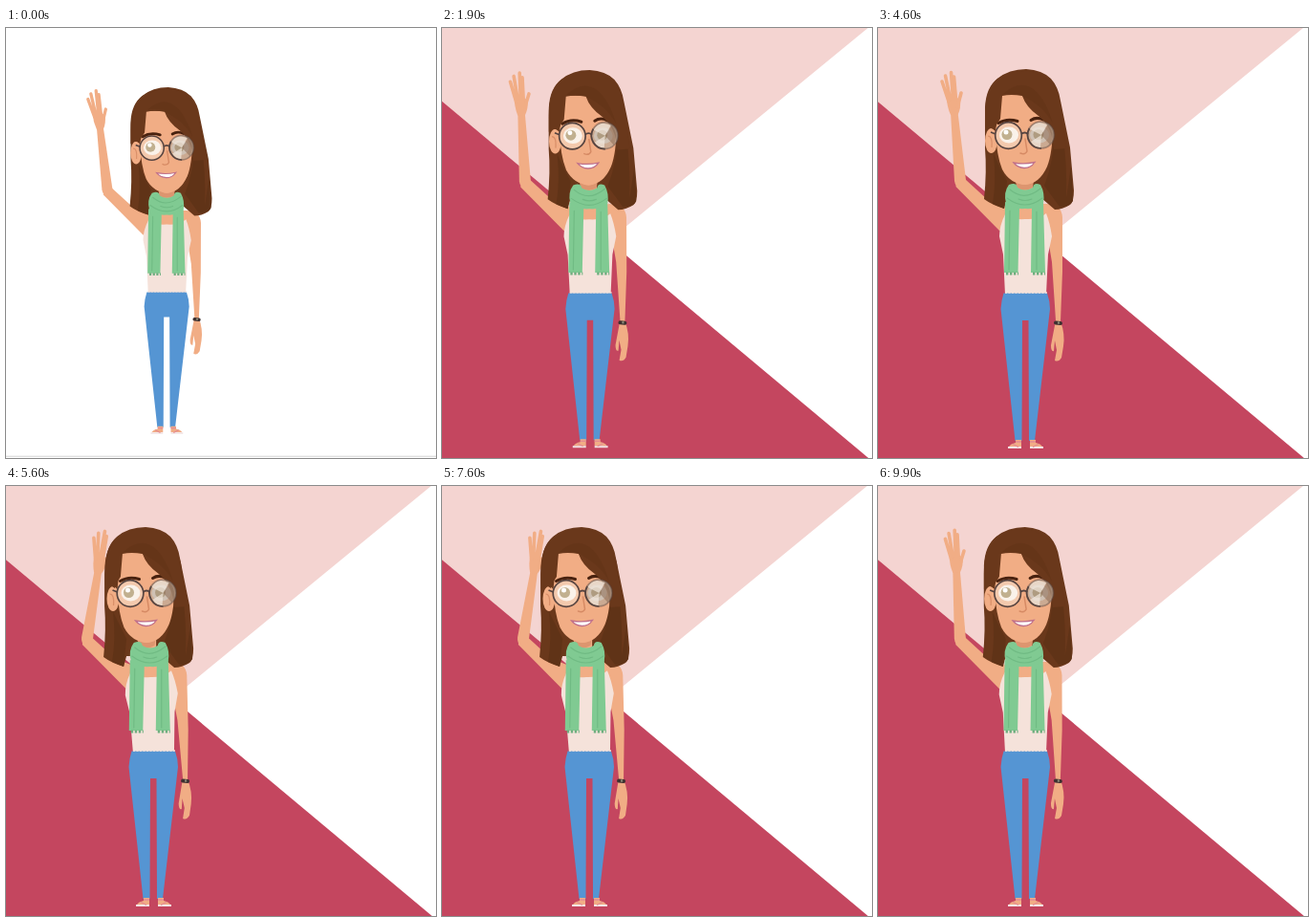
An HTML page that plays this animation: 450x450 px, repeating every 10 s.

```html
<!DOCTYPE html>
<html lang="en">
<head>
<meta charset="utf-8">
<title>Waving woman</title>
<style>
html, body { margin: 0; width: 100%; height: 100%; overflow: hidden; background: #fff; }
svg { display: block; width: 100vw; height: 100vh; }
.skin { fill: #f1ad85; }
.hair { fill: #6a381b; }
.dark { fill: #603317; }
.scarf { fill: #80ca92; }
.fold { fill: none; stroke: #70bb84; stroke-width: 1.2; stroke-linecap: round; }
.finger { fill: none; stroke: #f1ad85; stroke-width: 3.6; stroke-linecap: round; }
</style>
</head>
<body>
<svg viewBox="0 0 450 450">
<g id="scene">
  <path d="M-60 465.5H520" stroke="#d4d4d4" stroke-width="1.2"/>
  <path id="pink" fill="#f4d4d1" d="M-60-60H518L173 223-60 28Z"/>
  <path id="red" fill="#c4465f" d="M-60 27L520 512H-60Z"/>

  <g id="raisedArm">
    <path class="skin" d="M137 189L115 180 91 158Q82 158 81.500 166L127 212 140 210Z"/>
    <g id="forearm">
      <path class="skin" d="M76 88H83.500L92 159Q92 167 86 167 81 167 80 160Z"/>
      <path class="skin" d="M72 73Q79 69 86 75 87 84 83.500 91H76Q72 82 72 73Z"/>
      <path class="finger" d="M74 77L67 56M75.500 74L70.500 50M78.500 74L76.500 46.500M81.500 75L79.500 51M83 83L87 68"/>
    </g>
  </g>

  <g id="hangingArm">
    <path class="skin" d="M174 184Q192 183 193 198L193 255 191 307Q196 320 194 333L192 345Q189 350 185 348L187 337 185 327 184 338Q181 339 181 332L186 306 182 245 177 215Z"/>
    <path d="M186 308.500L191 309" stroke="#3d3030" stroke-width="4" stroke-linecap="round"/>
    <circle cx="189" cy="308.500" r="1.200" fill="#8d8d78"/>
  </g>

  <!-- body -->
  <g id="torso">
    <path class="skin" d="M135 184H176L180 212H128Z"/>
    <path fill="#f5e2da" d="M133 195Q127 207 127 218L131 237 133 279H176L178 237 182 218Q180 204 176 194 168 201 154 200 139 201 133 195Z"/>
    <path class="skin" d="M145 186H162L160 197Q153 202 147 196Z"/>
  </g>
  <path fill="#5595d3" d="M131.500 277.500H177Q180 286 180 294L164 432H158L157.500 306H151L150.500 432H143.500L128.500 294Q129 285 131.500 277.500Z"/>
  <path d="M133 277H177" stroke="#f5e2da" stroke-width="1.300" stroke-dasharray="2 1.500"/>
  <g id="foot">
    <path class="skin" d="M144 431H150V438H137Q139 435 144 434Z"/>
    <path d="M136 439H150" stroke="#f3e6e6" stroke-width="2"/>
    <path d="M141 435.500L147 438.500M144 433H150" stroke="#e58c92" stroke-width="1.300"/>
  </g>
  <use href="#foot" transform="translate(309) scale(-1 1)"/>

  <!-- head -->
  <g id="backHair">
    <path class="hair" d="M111 179Q114 150 112 126L112 92Q112 64 125 53 137 43 155 43 172 44 181 53 189 62 191 76L201 125 205 170Q205 182 201 185 193 190 185 190L171 178H135L132 189Q119 185 111 179Z"/>
    <path class="dark" d="M184 105Q185 138 174 165L190 187Q201 187 204 181L202 145 197 178Q198 140 193 108Z"/>
    <path class="dark" d="M121 132Q124 160 120 184L132 189 135 160Z"/>
  </g>
  <path class="skin" id="neck" d="M145 150H162V180H145Z"/>
  <g id="face">
    <path fill="#dd956f" d="M144 160Q153 168 163 160L162 167Q153 172 145 167Z"/>
    <ellipse class="skin" cx="118.500" cy="118" rx="6.500" ry="13"/>
    <path d="M115 113Q120 113 119 125" fill="none" stroke="#d98f69" stroke-width="1.200"/>
    <path class="skin" d="M127 70H154L183 100Q183 130 177 145 169 163 154 164 138 163 130 148 124 133 123 108Z"/>
    <path d="M126 99.500Q135 94 146 97.500M160 96.500Q166 92.500 173 96" fill="none" stroke="#49220f" stroke-width="3" stroke-linecap="round"/>
    <path d="M154 116L156 129Q154 133 149 131" fill="none" stroke="#d68a64" stroke-width="1.500" stroke-linecap="round"/>
    <path fill="#fff" stroke="#c0708a" stroke-width="1.300" d="M142 141Q153 143 164 140.500 160 146.500 153 146.500 146 146 142 141Z"/>
  </g>
  <g id="fringe">
    <path class="hair" d="M112 108L112 83Q113 62 125 53 137 44 158 45 184 51 191 80L197 126 184 127Q183 104 168 92 155 83 151 71 139 69 130 71L128 95Q124 100 122 107 116 102 112 108Z"/>
    <path class="dark" d="M131 69Q143 58 154 60 172 64 183 100 174 82 151 71 143 67 131 69Z" opacity=".5"/>
  </g>
  <g id="glasses">
    <g fill="#fff">
      <ellipse cx="137" cy="112" rx="10" ry="8.500"/>
      <ellipse cx="169" cy="112" rx="10" ry="8.500"/>
    </g>
    <g fill="#8d7a48">
      <circle cx="135" cy="111.500" r="5.500"/><circle cx="168" cy="111.500" r="5.500"/>
    </g>
    <circle cx="136.500" cy="112.500" r="13.800" fill="#f6e6d6" fill-opacity=".5"/>
    <circle cx="170.500" cy="112" r="14" fill="#bda997" fill-opacity=".72"/>
    <path fill="#f3e9df" fill-opacity=".7" d="M171 112L159 106Q162 99 169 99L177 101ZM171 112L160 119Q164 125 170 125Z"/>
    <path fill="#8d6c56" fill-opacity=".55" d="M171 112L178 101Q186 111 180 122Z"/>
    <circle cx="134" cy="109" r="2.500" fill="#fff"/>
    <g fill="none" stroke="#574440" stroke-width="1.700">
      <circle cx="136.500" cy="112.500" r="13.800"/>
      <path d="M150 111Q153.500 108 157 111M123 111L118 109"/>
      <path d="M171 126A14 14 0 0 1 158.500 105"/>
      <circle cx="170.500" cy="112" r="14" stroke-opacity=".45"/>
    </g>
  </g>

  <g id="scarf">
    <path class="scarf" d="M133 182L148 188 146.500 256H132ZM161 188L173 182 175 256H160Z"/>
    <path class="scarf" d="M137 164Q145 161 146 167 154 172 162 167 163 161 170 164 175 173 173 183 166 190 154 189 141 190 134 183 131 172 137 164Z"/>
    <path class="fold" d="M138 169Q153 182 170 168M135 178Q154 192 172 178M147 179Q154 182 161 179M138 191L137 253M166 192V253"/>
    <path d="M134 257H147M162 257H175" stroke="#6fae7f" stroke-width="3" stroke-dasharray="2.400 1.600"/>
  </g>
</g>
</svg>
<script>
const LOOP = 10000, STEP = 100, WAVE = 2000 / 3, REST = 0.095;
const clamp = v => Math.min(1, Math.max(0, v));
const set = (id, value) => document.getElementById(id).setAttribute('transform', value);
const slide = (id, x, y = 0) => set(id, `translate(${x} ${y})`);

function draw(t) {
  // slow camera push-in
  const zoom = 0.914 + 0.086 * clamp(t / 2000);
  set('scene', `translate(316 265) scale(${zoom}) translate(-316 -265)`);

  const away = (1 - clamp((t - 50) / 700)) ** 3;
  slide('pink', 0, -330 * away);
  slide('red', -580 * away);

  // wave: 0 is outward, 1 is towards the head
  const wave = (1 - Math.cos(2 * Math.PI * t / WAVE)) / 2 - REST;
  slide('raisedArm', -2 * wave);
  set('forearm', `rotate(${17.5 * wave} 87 162)`);
  set('hangingArm', `rotate(${-1.8 * wave} 187 345)`);
  set('torso', `rotate(${-2.5 * wave} 154 280)`);
  slide('scarf', -4 * wave);
  slide('neck', -6 * wave);
  slide('backHair', -11 * wave);
  slide('fringe', -10 * wave);
  slide('face', -8 * wave);
  slide('glasses', -8 * wave);
}

const start = performance.now();
function tick() {
  const t = (performance.now() - start) % LOOP;
  draw(Math.floor(t / STEP) * STEP);
  requestAnimationFrame(tick);
}
tick();
</script>
</body>
</html>
```
